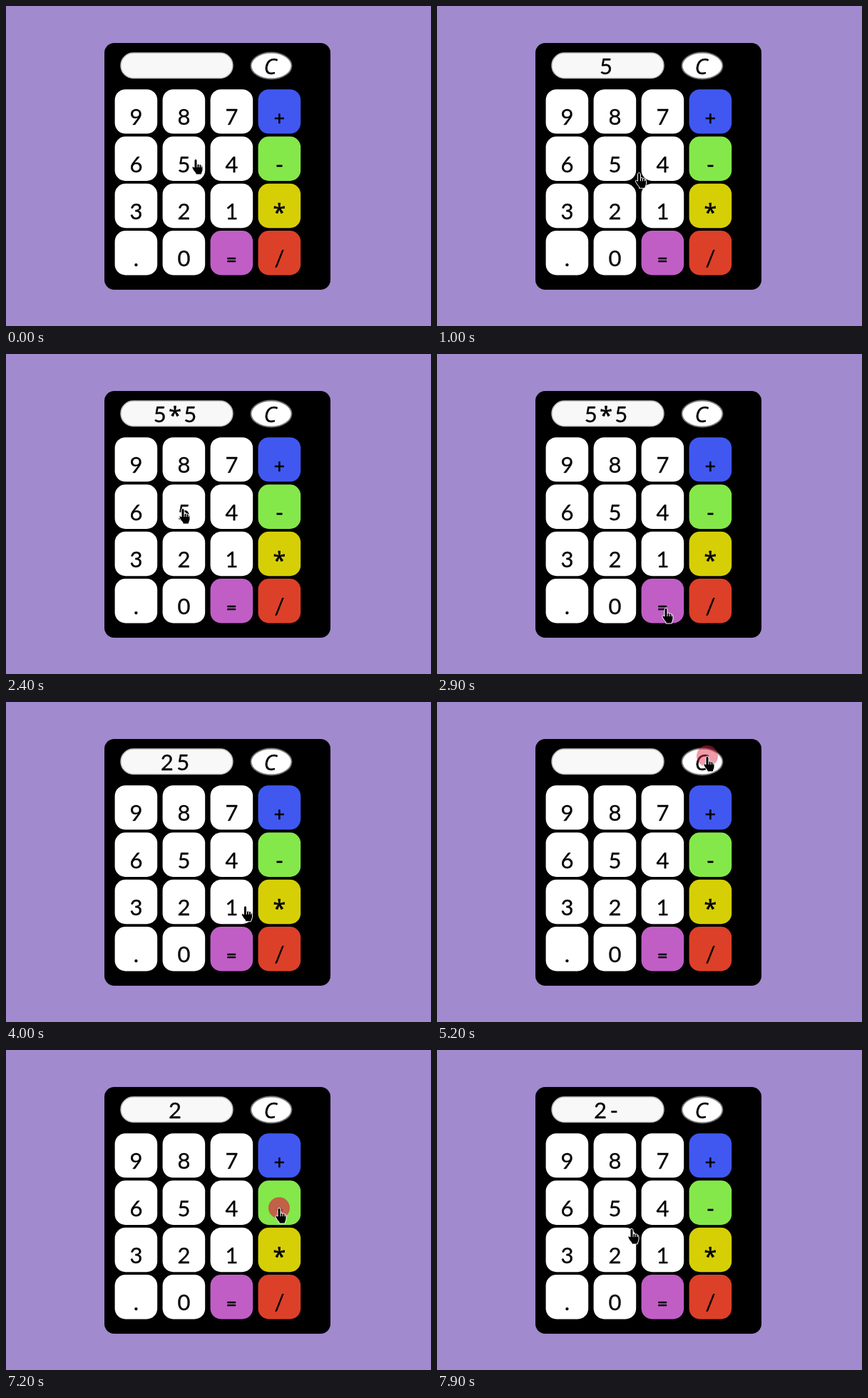
Write an HTML page that moves like this. It is 596 px wide and 450 px high and loops after 8000 ms.

```html
<!DOCTYPE html>
<html lang="en">
<head>
<meta charset="utf-8">
<title>Calculator</title>
<style>
  html, body { margin: 0; width: 100%; height: 100%; overflow: hidden; background: #a18acd; }
  svg { display: block; width: 100%; height: 100%; }
  text { font: 31px Lato, "Open Sans", sans-serif; text-anchor: middle; stroke: #000; stroke-width: .3; stroke-linejoin: round; }
  .star { font: 32px "Open Sans", sans-serif; stroke-width: .6; }
  .sign { font-size: 26px; stroke-width: .7; }
  .clear { font: italic 31px "Open Sans", sans-serif; }
</style>
</head>
<body>
<svg viewBox="0 0 596 450">
  <rect width="596" height="450" fill="#a18acd"/>
  <rect x="138" y="52" width="317" height="347" rx="14"/>
  <rect x="161" y="66" width="157" height="35.500" rx="17.700" fill="#f8f8f8" stroke="#b9bfb9" stroke-width="1.500"/>
  <ellipse cx="372" cy="84" rx="28.500" ry="18.500" fill="#fff" stroke="#777" stroke-width="1.800"/>
  <text class="clear" x="370.500" y="95.500">C</text>
  <g id="keys"></g>
  <g id="display"></g>
  <circle id="ripple" r="15" fill="#dc2846"/>
  <g id="hand" stroke="#fff">
    <path d="M-2 2Q0-2 2 2V8Q4 6 5 8Q7 7 8 9Q10 9 10 12V16L8 22H0V20Q-3 17-5 13Q-5 9-2 12Z"/>
    <path d="M2 8v4M5 8v4M8 9v3" fill="none"/>
  </g>
</svg>
<script>
const LOOP = 8000, STEP = 100, TRAVEL = 400, FADE = 300, GAP = 3;
const $ = id => document.getElementById(id);
const colors = { '+': '#4058f0', '-': '#84e84a', '*': '#d6cf06', '/': '#dc4028', '=': '#c05ec6' };

// The hand leaves for each stop, then clicks there; the reading follows one step later
const stops = [
  { leave: -TRAVEL, tip: [266, 215], show: '' },
  { leave: 0, tip: [250, 217], click: 500, show: '5' },
  { leave: 900, tip: [384, 286], click: 1300, show: '5*' },
  { leave: 1500, tip: [248, 217], click: 2100, show: '5*5' },
  { leave: 2500, tip: [321, 357], click: 3000, show: '25' },
  { leave: 3900, tip: [379, 76], click: 5100, show: '' },
  { leave: 5300, tip: [252, 292], click: 5800, show: '2' },
  { leave: 6300, tip: [383, 222], click: 7200, show: '2-' },
  { leave: 7500, tip: [273, 251] }
];

function glyph(ch, x, y) {
  const kind = ch === '*' ? 'star' : '+='.includes(ch) ? 'sign' : '';
  return `<text class="${kind}" x="${x}" y="${kind === 'star' ? y + 2 : y}">${ch}</text>`;
}

function drawKeys() {
  $('keys').innerHTML = [...'987+654-321*.0=/'].map((ch, i) => {
    const x = 152.6 + (i % 4) * 67, y = 117.2 + Math.floor(i / 4) * 66.3;
    return `<rect x="${x}" y="${y}" width="59.600" height="62.400" rx="15" fill="${colors[ch] || '#fff'}"/>`
      + glyph(ch, x + 29.8, y + 50);
  }).join('');
}

// Centred row of characters, each followed by a gap
function drawReading(str) {
  const width = ch => (ch === '*' ? 17 : ch === '-' ? 13 : 19.5);
  const chars = [...str];
  let x = 238.5 - chars.reduce((sum, ch) => sum + width(ch) + GAP, 0) / 2;
  $('display').innerHTML = chars.map(ch => {
    const mark = glyph(ch, x + width(ch) / 2, 96);
    x += width(ch) + GAP;
    return mark;
  }).join('');
}

function pointerAt(t) {
  const i = stops.findLastIndex(s => s.leave <= t);
  const to = stops[i].tip, from = stops[Math.max(0, i - 1)].tip;
  const u = Math.min(1, (t - stops[i].leave) / TRAVEL);
  return to.map((end, axis) => from[axis] + (end - from[axis]) * u);
}

let shown = null;
function render(time) {
  const t = Math.floor((time % LOOP) / STEP) * STEP;
  const [x, y] = pointerAt(t);
  $('hand').setAttribute('transform', `translate(${x} ${y})`);

  const clicked = stops.findLast(s => s.click <= t);
  const age = clicked ? t - clicked.click : FADE;
  const ripple = $('ripple');
  ripple.setAttribute('cx', x);
  ripple.setAttribute('cy', y);
  ripple.setAttribute('opacity', age < FADE ? 0.7 * (1 - age / FADE) : 0);

  const reading = (stops.findLast(s => s.click + STEP <= t) || stops[0]).show;
  if (reading !== shown) drawReading(shown = reading);
}

drawKeys();
render(0);
const start = performance.now();
(function tick() {
  render(performance.now() - start);
  requestAnimationFrame(tick);
})();
</script>
</body>
</html>
```
